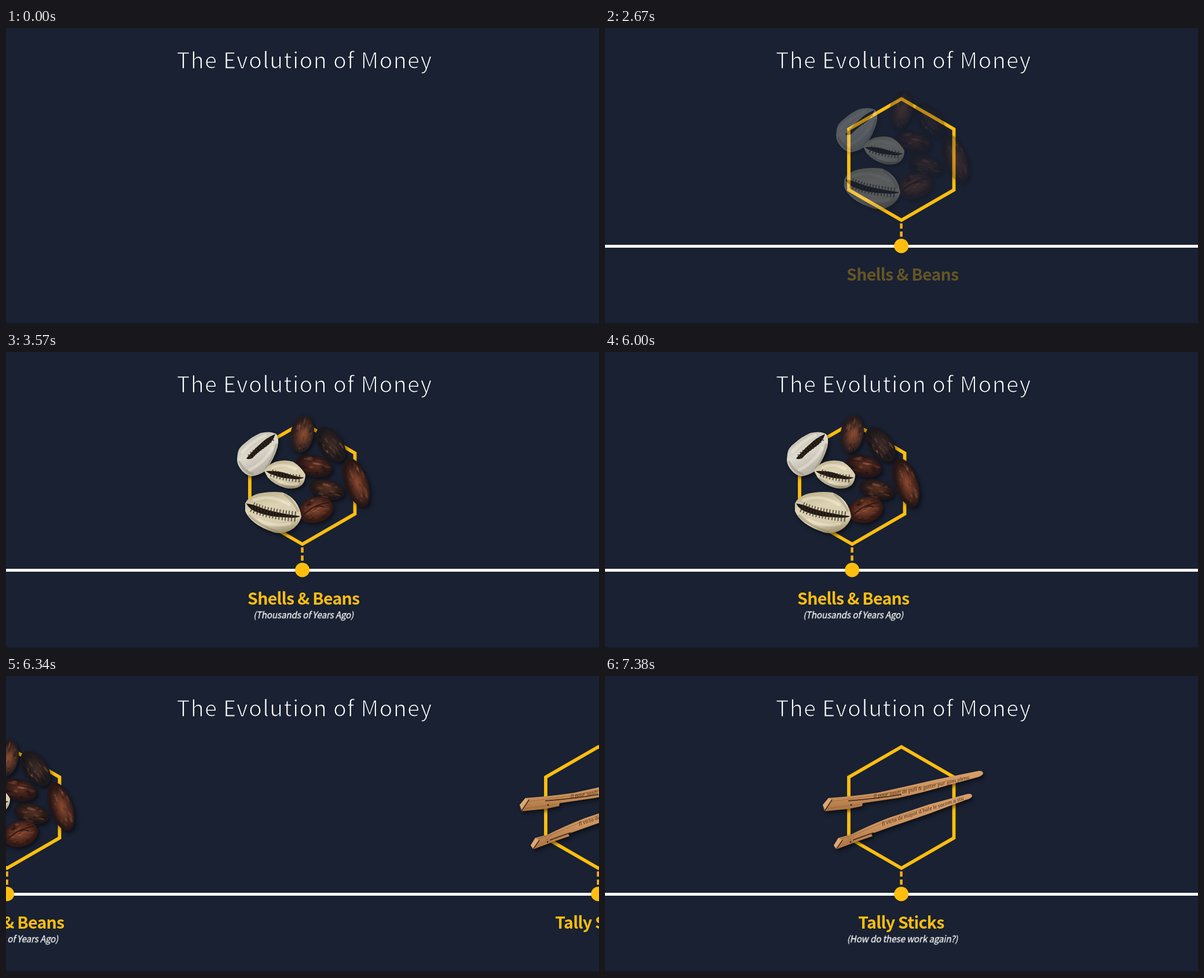
An HTML page for the animation above (8 s loop, 1024 by 512 pixels).

```html
<!DOCTYPE html>
<html lang="en">
<head>
<meta charset="utf-8">
<title>The Evolution of Money</title>
<style>
  html, body { margin: 0; width: 100%; height: 100%; overflow: hidden; background: #192132; }
  svg { display: block; width: 1024px; height: 512px; }

  text { font-family: "Noto Sans CJK JP", "Noto Sans CJK SC", "Noto Sans", sans-serif; text-anchor: middle; }
  .title { font-size: 37.6px; font-weight: 300; letter-spacing: 1.8px; fill: #fff; }
  .title.thin { font-size: 38px; letter-spacing: 1.2px; stroke: #192132; stroke-width: 1.2px; }
  .label { font-size: 28.6px; font-weight: 700; letter-spacing: -.77px; fill: #ffbe0f; }
  .sub { font-size: 15.2px; letter-spacing: -.14px; fill: #fff; stroke: #fff; stroke-width: .25px; }
  .script { font: italic 8.4px "Noto Serif", serif; text-anchor: start; fill: #3f2416; opacity: .9; }

  .hex { fill: none; stroke: #ffbe0f; stroke-width: 5.8; }
  .dash { fill: none; stroke: #fbae17; stroke-width: 4.5; stroke-dasharray: 9 5; }
  .dot { fill: #ffbe0f; }
  .photo { filter: drop-shadow(3px 4px 3px rgba(0, 0, 0, .5)); }
  .slit { fill: #1e1713; }
  .teeth { fill: none; stroke: #3a2e20; stroke-dasharray: 2 3.4; opacity: .75; }
  .ridge { fill: none; stroke: #fffaea; stroke-width: 5; stroke-linecap: round; opacity: .35; }
  .shade { fill: none; stroke: #75694f; stroke-width: 4; stroke-linecap: round; opacity: .3; }
  .grain { fill: none; stroke: #8a5a35; stroke-width: 1; opacity: .6; }

  .timed { animation: 8s step-end infinite; }
  .line { animation-name: line; }
  .dot1 { animation-name: dot; }
  .dash1 { animation-name: dash; }
  .hex1 { animation-name: hex; }
  .goods { animation-name: goods; }
  .sub1 { animation-name: sub1; }
  .sub2 { animation-name: sub2; }
  .track { animation-name: track; }

  @keyframes line { 0% { opacity: 0 } 5% { opacity: .33 } 6.25% { opacity: .67 } 7.5%, 100% { opacity: 1 } }
  @keyframes dot { 0% { opacity: 0 } 17.5%, 100% { opacity: 1 } }
  @keyframes dash { 0% { opacity: 0 } 25.875%, 100% { opacity: 1 } }
  @keyframes hex { 0% { opacity: 0 } 29.625%, 100% { opacity: 1 } }
  @keyframes goods { 0% { opacity: 0 } 33.375% { opacity: .33 } 34.625% { opacity: .67 } 35.875%, 100% { opacity: 1 } }
  @keyframes sub1 { 0% { opacity: 0 } 44.625%, 100% { opacity: 1 } }
  @keyframes sub2 { 0% { opacity: 0 } 92.25%, 100% { opacity: 1 } }
  @keyframes track {
    0% { transform: translateX(0) }
    75% { transform: translateX(-85px) }
    77.125% { transform: translateX(-252px) }
    79.25% { transform: translateX(-510px) }
    81.75% { transform: translateX(-678px) }
    83.875% { transform: translateX(-875px) }
    86.375%, 100% { transform: translateX(-1021px) }
  }
</style>
</head>
<body>
<svg viewBox="0 0 1024 512">
  <defs>
    <path id="hex" d="M511.8 122.6L602.5 175V280L511.8 332.4L421 280V175Z"/>
    <path id="dash" d="M511.6 338V361.5"/>
    <circle id="dot" cx="511.7" cy="377" r="12.5"/>
    <linearGradient id="pale" x1=".2" y1="0" x2=".7" y2="1">
      <stop offset="0" stop-color="#b9b4a6"/><stop offset=".45" stop-color="#dedacd"/><stop offset="1" stop-color="#aaa598"/>
    </linearGradient>
    <linearGradient id="cream" x1=".3" y1="0" x2=".6" y2="1">
      <stop offset="0" stop-color="#c0b38e"/><stop offset=".35" stop-color="#ddd3b4"/>
      <stop offset=".75" stop-color="#d8ceaf"/><stop offset="1" stop-color="#a0926f"/>
    </linearGradient>
    <linearGradient id="wood" x1="0" y1="0" x2=".12" y2="1">
      <stop offset="0" stop-color="#d9a26c"/><stop offset=".6" stop-color="#cb935e"/><stop offset="1" stop-color="#a8713f"/>
    </linearGradient>
    <path id="row1" d="M464 211Q545 200 652 172"/>
    <path id="row2" d="M479 259Q550 235 640 208"/>
  </defs>

  <rect width="1024" height="512" fill="#192132"/>
  <rect y="510" width="1024" height="2" fill="#141b2b"/>
  <text id="title" class="title" x="515.6" y="69.5">The Evolution of Money</text>
  <rect class="timed line" y="375" width="1024" height="5" fill="#fff"/>

  <g class="timed track">
    <g>
      <use href="#hex" class="hex timed hex1"/>
      <use href="#dash" class="dash timed dash1"/>
      <use href="#dot" class="dot timed dot1"/>
      <g class="timed goods">
        <g class="photo">
          <g id="beans"></g>
          <g>
            <path fill="url(#pale)" d="M400 176Q401 166 412 158Q425 146 440 140Q457 136 467 142Q472 150 469 164Q464 183 449 205Q438 213 424 215Q414 213 408 206Q399 196 399 186Z"/>
            <path class="ridge" d="M408 173Q426 153 448 144M420 204Q446 192 460 166"/>
            <path class="shade" d="M403 190Q410 206 426 211M449 201Q462 184 467 160"/>
            <path class="slit" d="M465 142Q461 156 447 165Q434 174 426 183Q419 187 415 184Q428 169 438 160Q450 148 465 142Z"/>
            <path class="teeth" stroke-width="10" d="M460 149Q447 160 436 168T419 184"/>
          </g>
          <g>
            <path fill="url(#cream)" d="M446 206Q452 195 465 190Q482 185 496 190Q510 199 517 212Q517 223 511 230Q500 239 482 235Q462 229 452 217Z"/>
            <path class="ridge" d="M460 200Q478 191 500 202M472 225Q486 231 503 228"/>
            <path class="shade" d="M456 219Q474 233 496 234"/>
            <path class="slit" d="M449 206Q468 205 484 210Q501 216 515 217Q507 222 490 219Q473 218 463 213Q454 211 449 206Z"/>
            <path class="teeth" stroke-width="13" d="M458 209Q480 217 508 219"/>
          </g>
          <g>
            <path fill="url(#cream)" d="M413 262Q417 252 432 246Q454 240 478 243Q491 248 500 259Q508 270 510 285Q506 300 492 308Q478 316 463 312Q442 305 430 296Q417 286 413 275Z"/>
            <path class="ridge" d="M428 256Q458 245 489 264M436 290Q460 304 490 297"/>
            <path class="shade" d="M420 283Q440 302 470 311M482 247Q498 260 504 275"/>
            <path class="slit" d="M415 262Q426 263 442 270Q465 278 508 284Q503 288 482 286Q454 285 436 278Q420 273 415 262Z"/>
            <path class="teeth" stroke-width="18" d="M425 268Q450 280 503 285"/>
          </g>
        </g>
        <text class="label" x="513.8" y="437">Shells &amp; Beans</text>
      </g>
      <g class="timed sub1"><text class="sub" transform="translate(513.6 461) skewX(-11)">(Thousands of Years Ago)</text></g>
    </g>

    <g transform="translate(1021)">
      <use href="#hex" class="hex"/>
      <use href="#dash" class="dash"/>
      <use href="#dot" class="dot"/>
      <g class="photo">
        <path fill="url(#wood)" d="M376 223L386 211Q430 208 470 202Q520 191 572 179L646 164Q653 164 653 169Q650 174 640 176L592 189Q548 202 506 211L445 220L444 225L420 230L379 234Z"/>
        <path fill="#dba873" d="M376 223L386 211L392 214L381 233Z"/>
        <path fill="none" stroke="#3d2618" stroke-width="1.6" d="M420 216Q470 212 512 205M392 214L379 234"/>
        <path class="grain" d="M390 217Q450 210 500 201T600 179M385 229L440 222M470 206L540 191"/>
        <circle cx="425" cy="223" r="1.5" fill="#3d2618"/>
        <path fill="url(#wood)" d="M395 293L403 280L425 274Q455 259 488 246L560 222L626 204Q634 203 634 208Q632 212 624 214L560 238L502 258L460 273L462 277L436 286L399 300Z"/>
        <path fill="#dba873" d="M395 293L403 280L410 284L400 299Z"/>
        <path fill="none" stroke="#3d2618" stroke-width="1.5" d="M410 284L399 300M428 284Q446 277 464 271"/>
        <path class="grain" d="M408 282Q440 272 470 258T560 226M418 276L428 289M430 276L418 288"/>
        <circle cx="424" cy="287" r="1.5" fill="#3d2618"/>
        <text class="script"><textPath href="#row1">Il pour sault de pull &amp; gatter pur gom plenu</textPath></text>
        <text class="script"><textPath href="#row2">Il victa de mayot d bate le sacom a stu</textPath></text>
      </g>
      <text class="label" x="511.4" y="437">Tally Sticks</text>
      <g class="timed sub2"><text class="sub" transform="translate(513.6 461) skewX(-11)">(How do these work again?)</text></g>
    </g>
  </g>
</svg>
<script>
  const NS = "http://www.w3.org/2000/svg";

  function add(parent, tag, attrs) {
    const el = document.createElementNS(NS, tag);
    for (const key in attrs) el.setAttribute(key, attrs[key]);
    return parent.appendChild(el);
  }

  let seed = 7;
  const rand = () => (seed = (seed * 16807) % 2147483647) / 2147483647;

  // Centre, half length, half width, angle of the long axis, edge and middle colour
  const beans = [
    [511.5, 141.5, 33, 20, 100, "#261c1d", "#84492f"],
    [561, 160, 35, 20, 54, "#1c181b", "#382925"],
    [532, 197, 32, 19, 14, "#241516", "#5a2d20"],
    [554, 238, 31, 17, 14, "#1f1718", "#553022"],
    [605, 226, 44, 20, 71, "#261615", "#84452c"],
    [535, 273, 31, 22, -16, "#341914", "#8a4a31"],
  ];
  const box = document.getElementById("beans");
  const defs = document.querySelector("defs");

  beans.forEach(([x, y, rx, ry, angle, edge, mid], i) => {
    const fill = add(defs, "radialGradient", { id: "bean" + i, cx: .52, cy: .45, r: .5 });
    add(fill, "stop", { offset: .1, "stop-color": mid });
    add(fill, "stop", { offset: .9, "stop-color": edge });
    const g = add(box, "g", { transform: `translate(${x} ${y}) rotate(${angle})` });
    add(g, "ellipse", { rx, ry, fill: `url(#bean${i})` });
    // Short streaks along the skin
    for (let n = 0; n < 26; n++) {
      const a = rand() * 2 * Math.PI, r = Math.sqrt(rand()) * .8;
      add(g, "ellipse", {
        cx: Math.cos(a) * r * rx, cy: Math.sin(a) * r * ry,
        rx: 2 + rand() * 5, ry: .6 + rand() * 1.6,
        fill: n % 2 ? "#120c0e" : "#b06c4e", opacity: .12 + rand() * .25,
      });
    }
  });
  add(box, "path", { d: "M514 282Q530 264 558 260M532 269Q542 264 549 268", fill: "none", stroke: "#2b1310", "stroke-width": 2.5, opacity: .8 });

  // Slim the title strokes when no light weight is installed
  const pen = document.createElement("canvas").getContext("2d");
  const width = weight => {
    pen.font = `${weight} 100px "Noto Sans CJK JP", "Noto Sans CJK SC", "Noto Sans", sans-serif`;
    return pen.measureText("Evolution").width;
  };
  if (width(300) === width(400)) document.getElementById("title").classList.add("thin");
</script>
</body>
</html>
```
